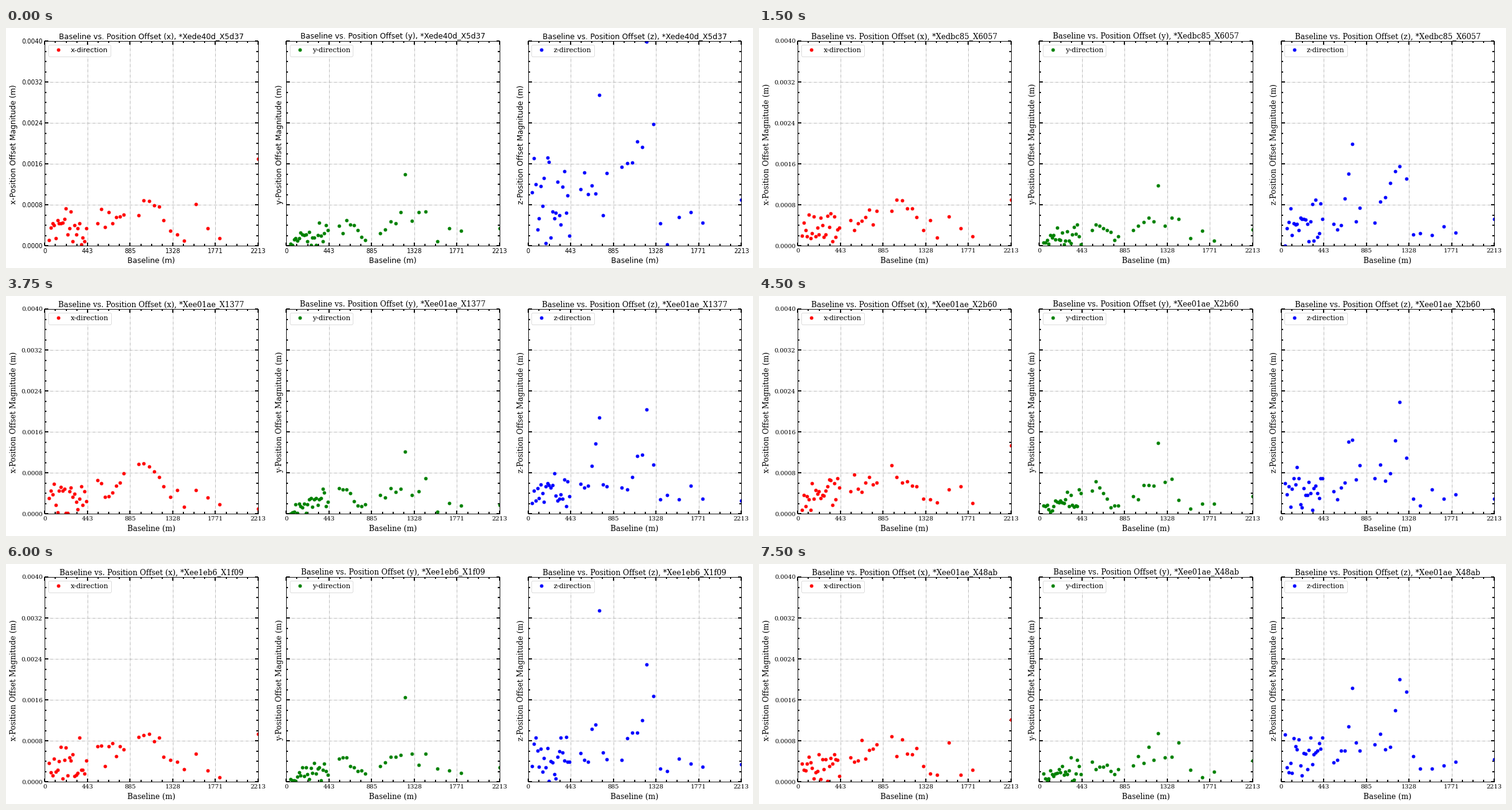
A matplotlib script that plays this animation: 1200 by 387 pixels, repeating every 8 s.

```python
import numpy as np
import matplotlib.pyplot as plt
from matplotlib.animation import FuncAnimation
from matplotlib.ticker import AutoMinorLocator

W, H, DPI = 1200, 387, 72        # at 72 dpi one point is one pixel
STEP, TICK, FRAMES = 750, 250, 32
B_MAX, V_MAX = 2213.4, 0.004
SANS, SERIF = "DejaVu Sans", "DejaVu Serif"

TAGS = ["ede40d_X5d37", "ede40d_X4c19", "edbc85_X6057", "edbc85_X5a82",
        "ede40d_X2246", "ee01ae_X1377", "ee01ae_X2b60", "ee1eb6_X1864",
        "ee1eb6_X1f09", "ede40d_X26d5", "ee01ae_X48ab"]


def curve(x, *points):
    """Piecewise linear curve through a few (x, y) points."""
    return np.interp(x, *zip(*points))


# baselines in metres: dense when short, sparse when long
BASE = curve(np.arange(44), (0, 45), (22, 429), (23, 548), (28, 739),
             (30, 816), (31, 974), (34, 1136), (36, 1232), (39, 1445),
             (42, 1810), (43, 2213))

# usual offset against baseline in x, y, z (units of 1e-5 m)
TREND = [
    curve(BASE, (45, 30), (400, 36), (548, 55), (639, 42), (1050, 86),
          (1200, 68), (1300, 32), (1445, 25), (1567, 72), (1810, 15),
          (2213, 95)),
    curve(BASE, (45, 8), (429, 28), (619, 45), (777, 15), (1184, 55),
          (1232, 135), (1303, 45), (1445, 60), (1567, 18), (2213, 22)),
    curve(BASE, (45, 46), (650, 50), (739, 185), (777, 70), (1000, 65),
          (1184, 125), (1232, 225), (1303, 130), (1374, 25), (2213, 45)),
]
SPREAD = curve(BASE, (429, 0.55), (548, 0.3), (1232, 0.14), (1374, 0.35))


def offsets(k, axis):
    """Offset magnitudes in metres for data set k along one axis."""
    rng = np.random.default_rng(100 + 10 * k + axis)
    gain = 1 + 0.7 * np.exp(-3 * k) * (axis == 2)    # z settles after the start
    noise = 1 + SPREAD * rng.standard_normal(len(BASE))
    return 1e-5 * gain * np.abs(TREND[axis] * noise)


fig = plt.figure(figsize=(W / DPI, H / DPI), dpi=DPI, facecolor="white")


def label(x, y, s, **kw):
    return fig.text(x / W, 1 - y / H, s, fontsize=12.15, family=SERIF,
                    ha="center", **kw)


def panel(i, left, label_x, name, color):
    top, bottom, width = 21, 351.3, 342.7
    ax = fig.add_axes([left / W, 1 - bottom / H, width / W, (bottom - top) / H])
    ax.set(xlim=(0, B_MAX), ylim=(0, V_MAX))
    ax.set_xticks(np.linspace(0, B_MAX, 6))
    ax.set_yticks(np.linspace(0, V_MAX, 6))
    ax.set_xticklabels([f"{v:.0f}" for v in ax.get_xticks()])
    ax.set_yticklabels([f"{v:.4f}" for v in ax.get_yticks()] if i == 0 else [])
    ax.xaxis.set_minor_locator(AutoMinorLocator(4))
    ax.yaxis.set_minor_locator(AutoMinorLocator(4))
    ax.tick_params(which="both", direction="in", top=True, right=True,
                   width=1.8, labelsize=9.75, pad=3.5)
    ax.tick_params(which="major", length=5.5)
    ax.tick_params(which="minor", length=3)
    ax.grid(True, ls="-.", lw=0.8, color="#b0b0b0")
    ax.set_axisbelow(True)
    for spine in ax.spines.values():
        spine.set_linewidth(0.9)

    dots, = ax.plot([], [], "o", color=color, ms=4.9, mew=0.8,
                    label=f"{name}-direction")
    legend = ax.legend(loc="upper left", prop={"family": SERIF, "size": 11.2})
    legend.get_frame().set_linewidth(0.8)

    mid = left + width / 2
    title = label(mid, 16.8, "", va="baseline")
    texts = [title,
             label(mid, 378.5, "Baseline (m)", va="baseline"),
             label(label_x, 187.5, f"{name}-Position Offset Magnitude (m)",
                   va="center", rotation=90)]
    texts += ax.get_xticklabels() + ax.get_yticklabels()
    if i == 0:
        texts += legend.get_texts()
    return name, dots, title, texts


panels = [panel(i, *args) for i, args in enumerate(
    [(62.3, 12.5, "x", "red"), (450.3, 440, "y", "green"),
     (838.5, 827, "z", "blue")])]


def update(n):
    k = n * TICK // STEP
    for axis, (name, dots, title, texts) in enumerate(panels):
        dots.set_data(BASE, offsets(k, axis))
        title.set_text(f"Baseline vs. Position Offset ({name}), *X{TAGS[k]}")
        for t in texts:
            t.set_family(SANS if k == 0 else SERIF)
    return []


anim = FuncAnimation(fig, update, frames=FRAMES, interval=TICK, repeat=True,
                     repeat_delay=0, blit=False)
plt.show()
```
